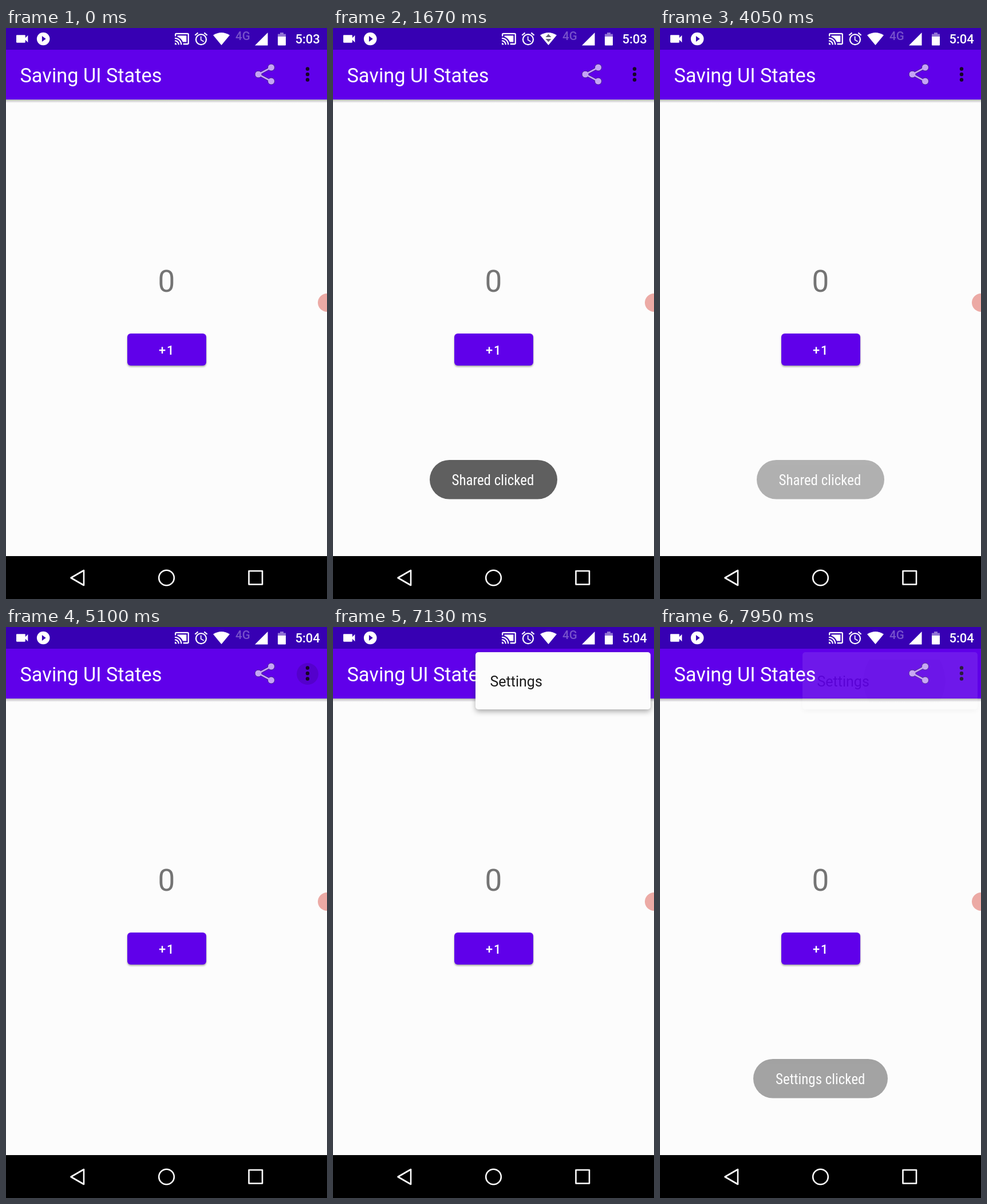
Recreate the animation shown at these times as an HTML page. Size 561 by 998 pixels, loop 8000 ms.

```html
<!DOCTYPE html>
<html lang="en">
<head>
<meta charset="utf-8">
<title>Saving UI States</title>
<style>
  html, body { margin: 0; width: 100%; height: 100%; overflow: hidden; background: #fcfcfc; }
  svg { display: block; width: 100vw; height: 100vh; font-family: Roboto, sans-serif; }
  .medium { font-weight: 500; }
  .toast text { font: 25px "Roboto Condensed", Roboto, sans-serif; font-stretch: 75%; fill: #fff; }
  .toast rect { fill: #5d5d5d; }
  .button { filter: drop-shadow(0 2px 1.5px rgba(0, 0, 0, .35)); }
  .card { filter: drop-shadow(0 4px 5px rgba(0, 0, 0, .32)); }
</style>
</head>
<body>
<svg viewBox="0 0 561 998" preserveAspectRatio="none">
  <defs>
    <linearGradient id="shade" x2="0" y2="1">
      <stop stop-opacity=".28"/>
      <stop offset="1" stop-opacity="0"/>
    </linearGradient>
    <clipPath id="cardClip"><rect id="clipRect"/></clipPath>
    <clipPath id="itemClip"><rect x="249" y="57" width="306" height="74.5"/></clipPath>
  </defs>

  <rect width="561" height="998" fill="#fcfcfc"/>
  <rect y="125" width="561" height="6" fill="url(#shade)"/>
  <rect y="37" width="561" height="88" fill="#6000ea"/>
  <rect width="561" height="38" fill="#3700b3"/>

  <!-- status bar -->
  <g fill="#fff">
    <path transform="translate(14.6 5.4) scale(1.13)" d="M17 10.5V7c0-.55-.45-1-1-1H4c-.55 0-1 .45-1 1v10c0 .55.45 1 1 1h12c.55 0 1-.45 1-1v-3.5l4 4v-11l-4 4z"/>
    <path transform="translate(51.6 5.4) scale(1.13)" d="M12 2a10 10 0 1 0 0 20a10 10 0 1 0 0-20zm-2 14.5v-9l6 4.5z"/>
    <path transform="translate(293.9 5.4) scale(1.13)" d="M1 18v3h3c0-1.66-1.34-3-3-3zm0-4v2c2.76 0 5 2.24 5 5h2c0-3.87-3.13-7-7-7zm18-7H5v1.63c3.96 1.28 7.09 4.41 8.37 8.37H19V7zM1 10v2c4.97 0 9 4.03 9 9h2c0-6.08-4.93-11-11-11zm20-7H3c-1.1 0-2 .9-2 2v3h2V5h18v14h-7v2h7c1.1 0 2-.9 2-2V5c0-1.1-.9-2-2-2z"/>
    <g transform="translate(327.4 5.4) scale(1.13)" fill="none" stroke="#fff" stroke-width="2">
      <circle cx="12" cy="13" r="8"/>
      <path d="M2.6 6.5L7.2 2.6M16.8 2.6l4.6 3.9"/>
      <path d="M11.75 8v5.6l4.4 2.6" stroke-width="1.5"/>
    </g>
    <path d="M376.5 30L362 12.5Q376.5 3.5 391 12.5z"/>
    <path id="traffic" fill="#66647a" d="M376.5 10.5l5 5.5h-10zM376.5 24.5l5-5.5h-10z"/>
    <text class="medium" x="401" y="20.500" font-size="20.500" fill-opacity=".32">4G</text>
    <path d="M435 30.500h22.500V8z"/>
    <path fill-opacity=".45" d="M475 15v-4.500h4V8h6v2.500h4V15z"/>
    <path d="M475 15h14v14.500q0 1-1 1h-12q-1 0-1-1z"/>
    <text id="clock" class="medium" x="505.500" y="27" font-size="22"></text>
  </g>

  <!-- app bar -->
  <text x="24.500" y="94.500" font-size="34.300" fill="#fff">Saving UI States</text>
  <circle id="shareRipple" cx="453" cy="82"/>
  <circle id="moreRipple" cx="527" cy="82"/>
  <g stroke="#44208f" fill="#c6a3f6">
    <path d="M463.500 69L441 81l22.500 12" fill="none" stroke-width="4.500"/>
    <circle cx="463.500" cy="69" r="6"/>
    <circle cx="441" cy="81" r="6"/>
    <circle cx="463.500" cy="93" r="6"/>
    <path d="M463.500 69L441 81l22.500 12" fill="none" stroke="#c6a3f6" stroke-width="2.600"/>
  </g>
  <g fill="#150626">
    <circle cx="527" cy="71.500" r="3.200"/>
    <circle cx="527" cy="81" r="3.200"/>
    <circle cx="527" cy="90.500" r="3.200"/>
  </g>

  <!-- content -->
  <text x="280.500" y="460.500" font-size="53" text-anchor="middle" fill="#747474">0</text>
  <rect class="button" x="212" y="534" width="138" height="56" rx="6" fill="#6000ea"/>
  <text class="medium" x="267" y="571" font-size="21.800" letter-spacing="1.950" fill="#fff">+1</text>
  <circle cx="561" cy="480" r="16" fill="#ecaaa5"/>

  <g class="toast" id="sharedToast">
    <rect x="169" y="755" width="223" height="68.500" rx="34.250"/>
    <text x="207.500" y="798.500">Shared clicked</text>
  </g>
  <g class="toast" id="settingsToast">
    <rect x="163" y="755" width="235" height="68.500" rx="34.250"/>
    <text x="202" y="798.500">Settings clicked</text>
  </g>

  <!-- overflow menu -->
  <g id="menu">
    <rect id="card" class="card" fill="#fcfcfc"/>
    <g clip-path="url(#cardClip)">
      <g clip-path="url(#itemClip)">
        <rect id="itemTint" x="249" y="57" width="306" height="75"/>
        <circle id="itemRipple" cx="427" cy="94"/>
      </g>
      <text id="menuText" font-size="25" fill="#1c1c1c">Settings</text>
    </g>
  </g>

  <!-- navigation bar -->
  <rect y="923" width="561" height="75"/>
  <g fill="none" stroke="#fff" stroke-width="2.600" stroke-linejoin="round">
    <path d="M113.500 961l22.500-13v26z"/>
    <circle cx="280.500" cy="961" r="13.300"/>
    <rect x="424.500" y="949" width="23.500" height="23.500"/>
  </g>
</svg>

<script>
  const LOOP = 8000, LAST_CHANGE = 7950;
  const $ = id => document.getElementById(id);
  const progress = (t, start, length) => Math.min(1, Math.max(0, (t - start) / length));
  const easeOut = (p, power) => 1 - (1 - p) ** power;
  const set = (id, attrs) => {
    for (const name in attrs) $(id).setAttribute(name, attrs[name]);
  };

  const toastIn = (t, start) => easeOut(progress(t, start, 1150), 2);

  function iconRipple(id, t, start) {
    const alpha = .13 * progress(t, start, 130) * (1 - progress(t, start + 270, 350));
    set(id, { r: 10 + 22 * easeOut(progress(t, start, 700), 2), 'fill-opacity': alpha });
  }

  function drawMenu(t) {
    const open = easeOut(progress(t, 5250, 900), 4);
    const hidden = 1 - open;
    const left = 249 + 306 * hidden;
    const box = {
      x: left, y: 44 - hidden * 20,
      width: 555 - left, height: 100 * (1 - hidden * .8),
      rx: open > .999 ? 5 : 0
    };
    const alpha = progress(t, 5250, 250) * (1 - progress(t, 7585, 405));
    set('menu', { opacity: alpha, visibility: alpha ? 'visible' : 'hidden' });
    set('card', box);
    set('clipRect', box);
    set('menuText', { x: 274.5 + 150 * hidden, y: 104 - 28 * hidden });

    const press = progress(t, 7130, 150);
    set('itemTint', { 'fill-opacity': .05 * press });
    set('itemRipple', { r: 15 + 56.5 * progress(t, 7130, 470), 'fill-opacity': .075 * press });
  }

  function draw(t) {
    $('clock').textContent = t < 3500 ? '5:03' : '5:04';
    set('traffic', { visibility: t >= 1600 && t < 3110 ? 'visible' : 'hidden' });
    iconRipple('shareRipple', t, 430);
    iconRipple('moreRipple', t, 4940);
    set('sharedToast', { opacity: toastIn(t, 665) * (1 - progress(t, 3110, 1300) ** 2) });
    set('settingsToast', { opacity: toastIn(t, 7565) });
    drawMenu(t);
  }

  function tick() {
    draw(Math.min(performance.now() % LOOP, LAST_CHANGE));
    requestAnimationFrame(tick);
  }
  tick();
</script>
</body>
</html>
```
